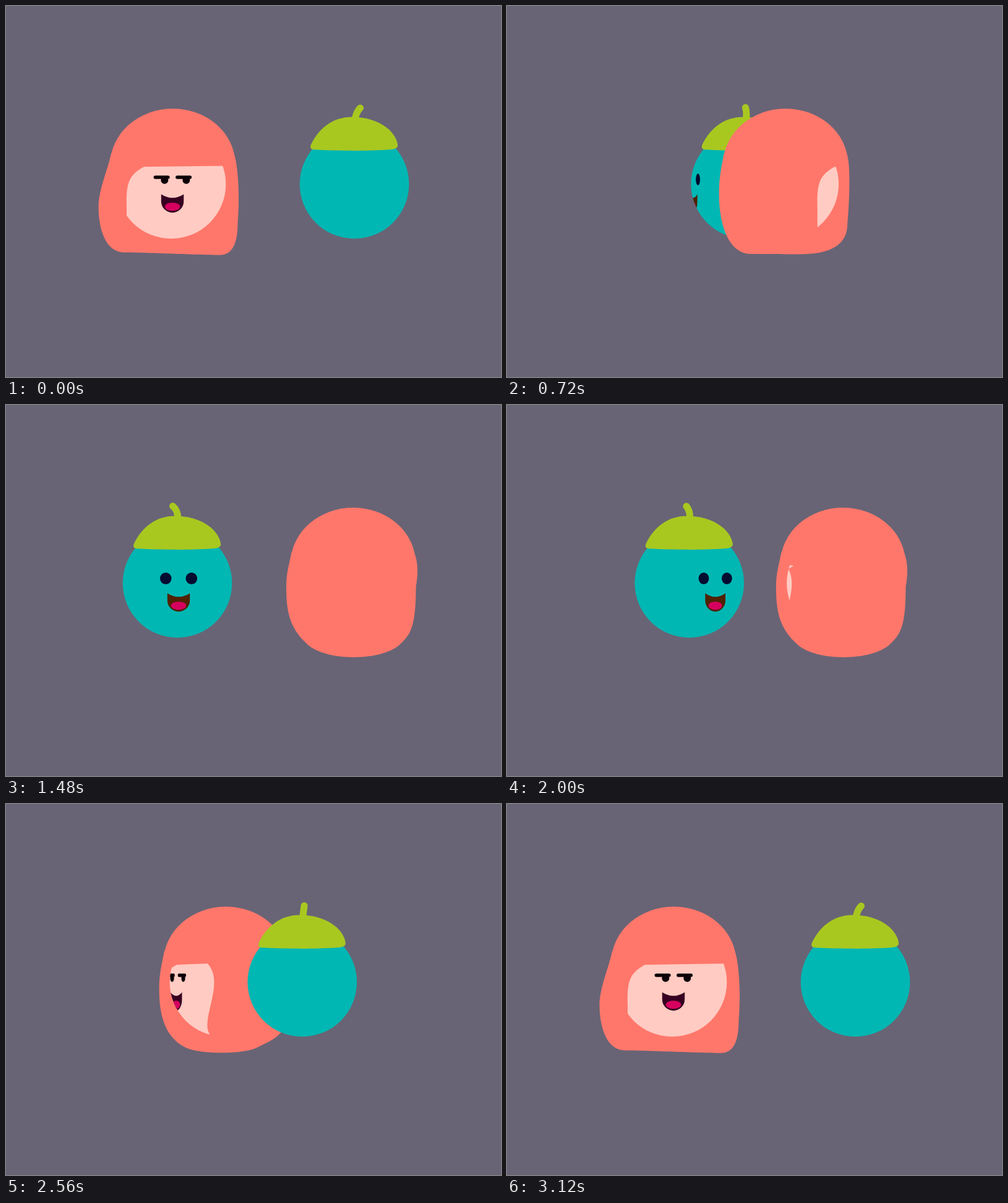
Recreate the animation shown at these times as an HTML page with a canvas. Size 800x600 px, loop 3160 ms.

```html
<!DOCTYPE html>
<html lang="en">
<head>
<meta charset="utf-8">
<title>Orbiting heads</title>
<style>
  html, body { margin: 0; width: 100%; height: 100%; overflow: hidden; background: #686475; }
  canvas { display: block; width: 800px; height: 600px; }
</style>
</head>
<body>
<canvas id="stage" width="800" height="600"></canvas>
<script>
const ctx = document.getElementById('stage').getContext('2d');
const LOOP = 3160, STEP = 40, RADIUS = 88.3, MID_Y = 288;
const HALF = 1515, SWAP_TIME = 1180, SWAP_OUT = 629, SWAP_BACK = 2401;
const COLOR = {
  bg: '#686475', hair: '#ff776b', skin: '#ffcbc2', teal: '#00b7b3', cap: '#a8c820',
  ink: '#0c0006', navy: '#020c30', plum: '#380021', brown: '#4f2200', tongue: '#d6005f'
};

const clamp = v => Math.min(1, Math.max(0, v));
const mix = (a, b, p) => a + (b - a) * p;

// Straight lines through [time, value] keys.
function track(t, ...keys) {
  return keys.reduce((value, [time, next], i) => {
    if (i === 0) return next;
    const before = keys[i - 1][0];
    return mix(value, next, clamp((t - before) / (time - before)));
  }, 0);
}

// Half turns made: 0 with the girl on the left, 1 with the girl on the right.
function halfTurn(t) {
  const ramp = middle => clamp(.5 + (t - middle) / SWAP_TIME);
  return ramp(SWAP_OUT) - ramp(SWAP_BACK);
}

const swing = turn => (1 - Math.cos(Math.PI * turn)) / 2;

// Body of the hair: left bulge, two bottom corners, right bulge, and how round the bottom is.
const HAIR = [
  { lx: -120, ly: 325, bx: -79, by: 398.5, cx: 76, cy: 402.7, rx: 105, ry: 350, round: 0 },
  { lx: -107.5, ly: 305, bx: -56, by: 401, cx: 22, cy: 401.5, rx: 100, ry: 352, round: 0 },
  { lx: -108, ly: 298, bx: -74, by: 387, cx: 76, cy: 387, rx: 101.5, ry: 294, round: .93 }
];

function hairPose(pose) {
  const i = Math.min(Math.floor(pose), 1), h = {};
  for (const key in HAIR[i]) h[key] = mix(HAIR[i][key], HAIR[i + 1][key], pose - i);
  return h;
}

function fill(color) {
  ctx.fillStyle = color;
  ctx.fill();
}

function ellipse(x, y, rx, ry, color) {
  ctx.beginPath();
  ctx.ellipse(x, y, rx, ry, 0, 0, 2 * Math.PI);
  if (color) fill(color);
}

function line(color, width, trace) {
  ctx.beginPath();
  trace();
  ctx.strokeStyle = color;
  ctx.lineWidth = width;
  ctx.lineCap = 'round';
  ctx.stroke();
}

function mouth(color) {
  ctx.save();
  ctx.beginPath();
  ctx.moveTo(-18.2, 304.5);
  ctx.quadraticCurveTo(0, 316, 18.2, 304.5);
  ctx.lineTo(18.2, 316);
  ctx.arc(0, 316, 18.2, 0, Math.PI);
  ctx.closePath();
  fill(color);
  ctx.clip();
  ellipse(0, 324.6, 12.2, 6.7, COLOR.tongue);
  ctx.restore();
}

// Slides a face around the ball of the head.
function turned(turn, draw) {
  const angle = 2.82 * turn, width = Math.cos(angle);
  if (width <= 0) return;
  ctx.save();
  ctx.translate(92 * Math.sin(angle), 0);
  ctx.scale(width, 1);
  ctx.translate(2, 0);
  draw();
  ctx.restore();
}

function girlFace() {
  for (const x of [-12.7, 22.3]) ellipse(x, 281.8, 6, 6, COLOR.ink);
  for (const x of [-27.7, 7.8]) {
    line(COLOR.ink, 5.5, () => { ctx.moveTo(x, 277); ctx.lineTo(x + 20.5, 277); });
  }
  mouth(COLOR.plum);
}

function fruitFace() {
  for (const x of [-20.8, 20.8]) ellipse(x, 280.5, 9.3, 9.5, COLOR.navy);
  mouth(COLOR.brown);
}

function hair(t) {
  ctx.beginPath();
  ctx.ellipse(0, 256, 101, 90, 0, Math.PI + .11, 2 * Math.PI - .11);
  fill(COLOR.hair);

  const { lx, ly, bx, by, cx, cy, rx, ry, round } =
    hairPose(track(t, [0, 0], [720, 1], [1400, 2], [2340, 2], [2800, 1], [3120, 0]));
  const left = .7 * (bx - lx), bottom = .2 * (cx - bx), right = .65 * (rx - cx);
  ctx.beginPath();
  ctx.moveTo(-99.5, 238);
  ctx.bezierCurveTo(-104, 262, lx, ly - 28, lx, ly);
  ctx.bezierCurveTo(lx, mix(ly, by, .5), bx - left, by - round * left, bx, by);
  ctx.bezierCurveTo(bx + bottom, by + round * bottom, cx - bottom, cy + round * bottom, cx, cy);
  ctx.bezierCurveTo(cx + right, cy - round * right, rx, mix(ry, cy, .7), rx, ry);
  ctx.bezierCurveTo(rx + 4, mix(ry, 239, .4), 105, 255, 99, 239);
  fill(COLOR.hair);
}

// Opening between the left and right locks, under the fringe.
function opening(t) {
  const out = t < HALF;
  const l = out ? -72 + .175 * t : track(t, [2800, -105], [3120, -72]);
  const r = out ? 150 : track(t, [1850, -105], [2000, -86], [2800, 5], [3120, 100]);
  ctx.beginPath();
  ctx.moveTo(l, 90);
  ctx.lineTo(l, 40);
  ctx.bezierCurveTo(l - 1, 0, l + 2, -14, l + 28, -28);
  ctx.lineTo(r - 5, -30);
  ctx.bezierCurveTo(r + 27, 4, r - 25, 70, r + 4, 90);
  ctx.closePath();
}

function girl(t) {
  const turn = halfTurn(t);
  ctx.save();
  ctx.translate(269.5 + 291.5 * swing(turn), 0);
  hair(t);
  ctx.translate(-2.5, MID_Y);
  ellipse(0, 0, RADIUS, RADIUS);
  ctx.clip();
  opening(t);
  fill(COLOR.skin);
  ctx.clip();
  ctx.translate(0, -MID_Y);
  turned(t < HALF ? turn : -turn, girlFace);
  ctx.restore();
}

function cap() {
  ctx.beginPath();
  ctx.moveTo(-70.5, 225);
  ctx.bezierCurveTo(-58, 198, -35, 179.5, -4, 179.5);
  ctx.bezierCurveTo(36, 179.5, 66, 200, 70, 224);
  ctx.quadraticCurveTo(71, 230.5, 62, 231.8);
  ctx.bezierCurveTo(30, 235, -30, 234, -66, 232.3);
  ctx.quadraticCurveTo(-72.5, 231.5, -70.5, 225);
  fill(COLOR.cap);
}

function fruit(t) {
  const turn = halfTurn(t), lean = 8.5 * (1 - 2 * turn);
  ctx.save();
  ctx.translate(563 - 286 * swing(turn), 0);
  ctx.save();
  ellipse(0, MID_Y, RADIUS, RADIUS, COLOR.teal);
  ctx.clip();
  turned(t < HALF ? turn - 1 : 1 - turn, fruitFace);
  ctx.restore();
  line(COLOR.cap, 11, () => {
    ctx.moveTo(1, 183);
    ctx.quadraticCurveTo(2 + lean * .2, 170, 1 + lean, 164.2 + lean * .08);
  });
  cap();
  ctx.restore();
}

function render(now) {
  const t = Math.floor((now % LOOP) / STEP) * STEP;
  ctx.fillStyle = COLOR.bg;
  ctx.fillRect(0, 0, 800, 600);
  const order = t < HALF ? [fruit, girl] : [girl, fruit];
  order.forEach(draw => draw(t));
}

const start = performance.now();
function tick() {
  render(performance.now() - start);
  requestAnimationFrame(tick);
}
tick();
</script>
</body>
</html>
```
